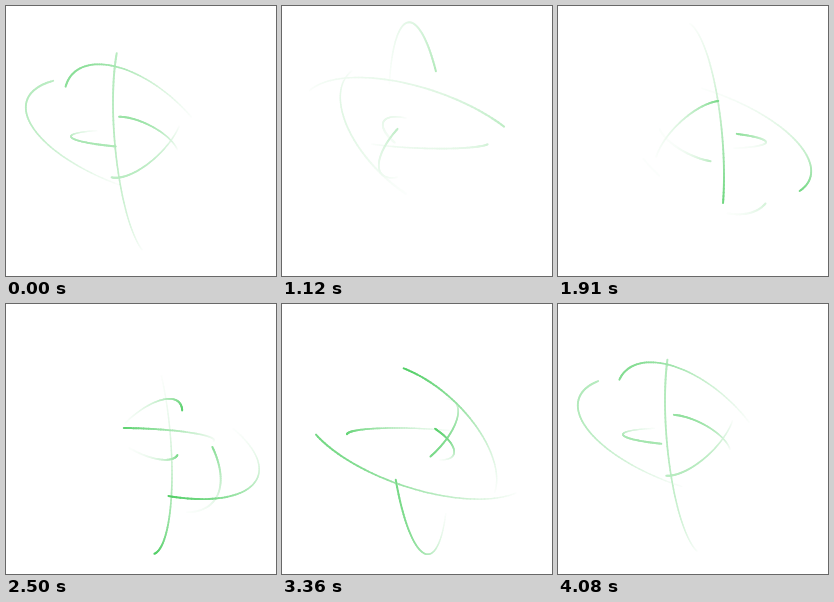
Animation, 270 px wide and 270 px high, one loop 4150 ms. Source, as an HTML page with a canvas:

```html
<!DOCTYPE html>
<html lang="en">
<head>
<meta charset="utf-8">
<title>Orbit trails</title>
<style>
  html, body { margin: 0; width: 100%; height: 100%; overflow: hidden; background: #fff; }
  canvas { display: block; width: 100vw; height: 100vh; }
</style>
</head>
<body>
<canvas id="stage"></canvas>
<script>
const LOOP = 4150, STEPS = 63, SIZE = 270;
const TRAIL = 120, SLICE = 2;      // degrees
const CENTER = { x: 136.5, y: 133.3 };
const INK = [82, 207, 102];

// rx, ry: radii; px, py: phase of the maxima; dim: faintest phase; mid, swing: strength
const orbits = [
  { rx: 29.5,  ry: 117,  px: 151,   py: 222.7, dim: 45,  mid: 0.65, swing: 0.35 },
  { rx: 78.2,  ry: 75,   px: 190.5, py: 134.6, dim: 108, mid: 0.5,  swing: 0.5 },
  { rx: 116.7, ry: 61.8, px: 140,   py: 199,   dim: 50,  mid: 0.63, swing: 0.37 },
  { rx: 35.7,  ry: 22.5, px: 229,   py: 179,   dim: 95,  mid: 0.52, swing: 0.45 },
  { rx: 71.5,  ry: 9.3,  px: 112,   py: 40,    dim: 70,  mid: 0.6,  swing: 0.38 },
  { rx: 39.7,  ry: 38.5, px: 219,   py: -8.5,  dim: 50,  mid: 0.6,  swing: 0.36 }
];

const canvas = document.getElementById("stage");
const ctx = canvas.getContext("2d");
const cosDeg = a => Math.cos(a * Math.PI / 180);

function resize() {
  const ratio = window.devicePixelRatio || 1;
  canvas.width = Math.round(innerWidth * ratio);
  canvas.height = Math.round(innerHeight * ratio);
}

function pointAt(o, angle) {
  return [
    CENTER.x + o.rx * cosDeg(angle - o.px),
    CENTER.y + o.ry * cosDeg(angle - o.py)
  ];
}

function tint(alpha) {
  return `rgb(${INK.map(c => Math.round(255 - (255 - c) * alpha)).join(",")})`;
}

function drawTrail(o, head) {
  for (let age = TRAIL - SLICE; age >= 0; age -= SLICE) {
    const angle = head - age;
    const life = 1 - age / TRAIL;
    const alpha = life * (o.mid - o.swing * cosDeg(angle - o.dim));
    if (alpha < 0.02) continue;
    ctx.strokeStyle = tint(alpha);
    ctx.lineWidth = 1.2 + 0.8 * life;
    ctx.beginPath();
    ctx.moveTo(...pointAt(o, angle - SLICE));
    ctx.lineTo(...pointAt(o, angle));
    ctx.stroke();
  }
}

function draw(time) {
  const step = Math.floor((time % LOOP + 8) * STEPS / LOOP) % STEPS;
  ctx.setTransform(canvas.width / SIZE, 0, 0, canvas.height / SIZE, 0, 0);
  ctx.globalCompositeOperation = "source-over";
  ctx.fillStyle = "#fff";
  ctx.fillRect(0, 0, SIZE, SIZE);
  // Darken lets slices overlap without visible joints
  ctx.globalCompositeOperation = "darken";
  ctx.lineCap = "round";
  orbits.forEach(o => drawTrail(o, step * 360 / STEPS));
}

addEventListener("resize", resize);
resize();
const start = performance.now();
function tick() {
  draw(performance.now() - start);
  requestAnimationFrame(tick);
}
tick();
</script>
</body>
</html>
```
